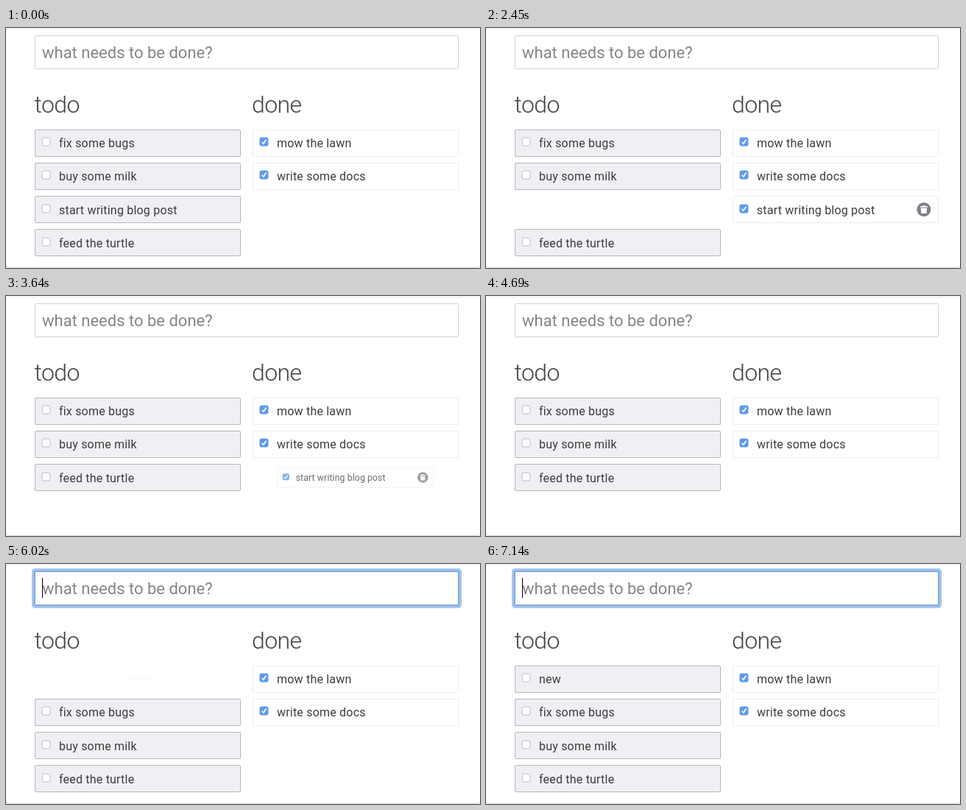
Write an HTML page that moves like this. It is 644 px wide and 326 px high and loops after 7.56 s.

```html
<!DOCTYPE html>
<html lang="en">
<head>
<meta charset="utf-8">
<title>todo</title>
<style>
  html, body { margin: 0; height: 100%; overflow: hidden; background: #fff; }
  svg { display: block; width: 644px; height: 326px; font-family: Roboto, Inter, sans-serif; }
  .head { font-size: 32px; font-weight: 300; letter-spacing: -.6px; fill: #444; }
  .field { font-size: 22px; }
  .label { font-size: 16px; letter-spacing: .2px; fill: #3c3c3c; }
</style>
</head>
<body>
<svg id="stage" viewBox="0 0 644 326">
  <path d="M0 1.5H644" stroke="#ececec"/>
  <path d="M0 322.5Q0 325.5 4 325.5H640Q644 325.5 644 322.5" fill="none" stroke="#d4d4d4"/>
  <g id="ring" fill="none">
    <rect x="37" y="8" width="580" height="50" rx="2.5" stroke="#a3c7f0" stroke-width="4"/>
    <rect x="39" y="10" width="576" height="46" rx="1" stroke="#7fabdc" stroke-width="2"/>
  </g>
  <rect id="input" x="39.5" y="10.5" width="575" height="45" rx="1" fill="#fff" stroke="#d2d2d2"/>
  <text id="field" class="field" x="49" y="41"></text>
  <rect id="caret" y="19" width="1" height="27"/>
  <text class="head" x="38.5" y="115">todo</text>
  <text class="head" x="334" y="115">done</text>
</svg>
<script>
const LOOP = 7560, STEP = 70;
const LEFT = 39, RIGHT = 335, TOP = 138, PITCH = 45, WIDTH = 280, HEIGHT = 37;
const SEND = 2225, SEND_TIME = Math.sqrt((RIGHT - LEFT) * 200);
const REMOVE = 3608, FOCUS = 4760, ADD = 6004, SCALE_TIME = 600;

const $ = id => document.getElementById(id);
const clamp = v => Math.min(1, Math.max(0, v));
const progress = (t, start, length) => clamp((t - start) / length);
const easeOut = (p, power) => 1 - (1 - p) ** power;

const checkbox = done => done
  ? `<rect x="9.5" y="10.5" width="12" height="12" rx="3" fill="#5c9aec"/>
     <path d="M12.6 16.8l2.2 2.4 3.8-5.6" fill="none" stroke="#fff" stroke-width="1.7"/>`
  : `<rect x="10" y="11" width="11" height="11" rx="2.5" fill="#fff" stroke="#bcbcc0"/>`;

const trash = `<g class="trash" transform="translate(260 18.5)">
  <circle r="9.5" fill="#807f87"/>
  <path d="M-5-4.6H-1.6V-5.6H1.6V-4.6H5V-3H-5ZM-4.2-2H4.2L3.6 5.4H-3.6Z" fill="#fff"/></g>`;

function makeItem(text, done, checked = done) {
  const el = document.createElementNS('http://www.w3.org/2000/svg', 'g');
  el.innerHTML = `<rect x=".5" y=".5" width="${WIDTH - 1}" height="${HEIGHT - 1}" rx="1.5"
      fill="${done ? '#fff' : '#f0eff4'}" stroke="${done ? '#ececef' : '#b5b5bc'}"/>
    <g class="content">${checkbox(checked)}<text class="label" x="33" y="24">${text}</text></g>${trash}`;
  $('stage').append(el);
  const content = el.querySelector('.content'), icon = el.querySelector('.trash');
  return (x, slot, { scale = 1, alpha = 1, hover = 0 } = {}) => {
    const cx = WIDTH / 2, cy = HEIGHT / 2;
    el.setAttribute('transform',
      `translate(${x + cx} ${TOP + PITCH * slot + cy}) scale(${scale}) translate(${-cx} ${-cy})`);
    el.setAttribute('opacity', alpha);
    // lower rows sit on a fractional pitch, so their content lands 1px lower
    content.setAttribute('transform', `translate(0 ${slot > 1 ? 1 : 0})`);
    icon.setAttribute('opacity', hover);
  };
}

const fix = makeItem('fix some bugs', false);
const milk = makeItem('buy some milk', false);
const blog = makeItem('start writing blog post', false);
const turtle = makeItem('feed the turtle', false);
const fresh = makeItem('new', false);
const lawn = makeItem('mow the lawn', true);
const docs = makeItem('write some docs', true);
const blogSent = makeItem('start writing blog post', false, true);
const blogDone = makeItem('start writing blog post', true);

function drawField(t) {
  const typed = t < 5740 || t >= ADD ? '' : t < 5880 ? 'ne' : 'new';
  const focused = t >= FOCUS;
  const field = $('field'), caret = $('caret');
  field.textContent = typed || 'what needs to be done?';
  field.setAttribute('fill', typed ? '#444' : '#858585');
  $('ring').setAttribute('opacity', +focused);
  $('input').setAttribute('stroke', focused ? '#8fa9c6' : '#d2d2d2');
  const blinkedOff = (t >= 5390 && t < 5740) || (t >= 6580 && t < 7140);
  caret.setAttribute('opacity', +(focused && !blinkedOff));
  caret.setAttribute('x', 49 + (typed ? Math.round(field.getComputedTextLength()) : 0));
}

function draw(t) {
  const added = t >= ADD ? 1 : 0;
  const moved = easeOut(progress(t, SEND, SEND_TIME), 3);
  const sending = t >= SEND && t < SEND + SEND_TIME;
  const flyX = LEFT + (RIGHT - LEFT) * moved;
  const removed = easeOut(progress(t, REMOVE, SCALE_TIME), 5);
  const grown = easeOut(progress(t, ADD, SCALE_TIME), 5);

  drawField(t);
  fix(LEFT, added);
  milk(LEFT, 1 + added);
  turtle(LEFT, (t < SEND + SEND_TIME ? 3 : 2) + added);
  lawn(RIGHT, 0);
  docs(RIGHT, 1);
  blog(LEFT, 2, { alpha: +(t < SEND), hover: progress(t, 1480, 200) });
  blogSent(flyX, 2, { alpha: sending ? 1 - moved : 0, hover: 1 });
  blogDone(flyX, 2, { alpha: moved * (1 - removed), scale: 1 - removed, hover: 1 });
  fresh(LEFT, 0, { alpha: grown, scale: grown });
}

const start = performance.now();
function tick() {
  const t = (performance.now() - start) % LOOP;
  draw(Math.floor(t / STEP) * STEP);
  requestAnimationFrame(tick);
}
tick();
</script>
</body>
</html>
```
